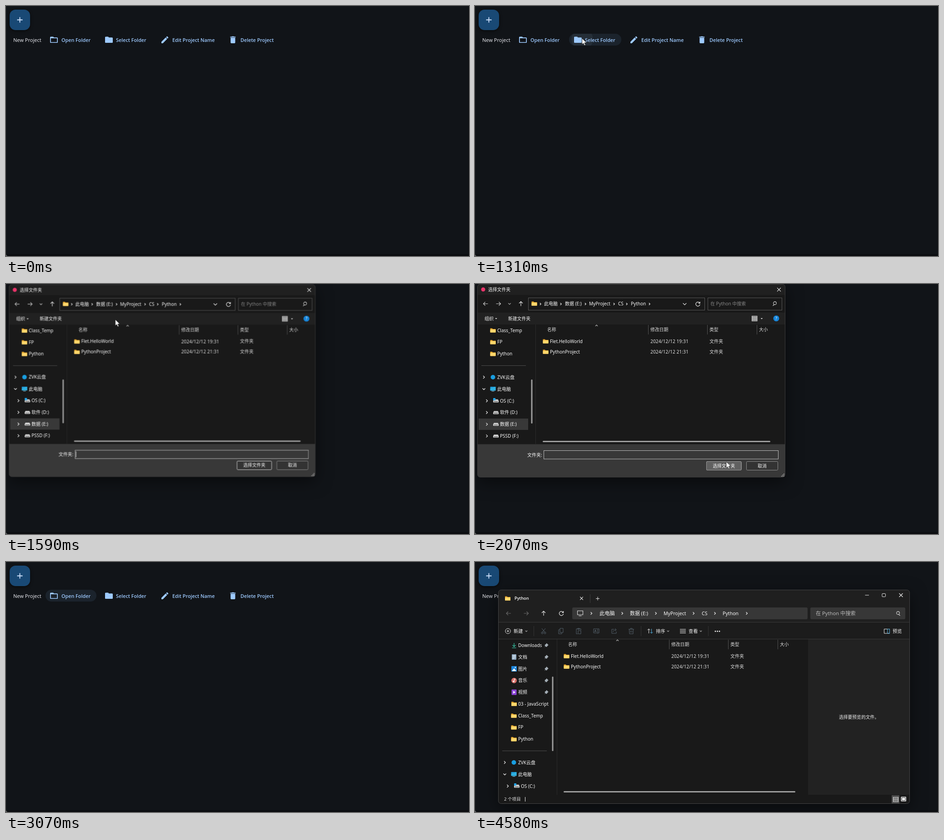
Write an HTML page that moves like this. It is 1019 px wide and 550 px high and loops after 5.45 s.

```html
<!DOCTYPE html>
<html lang="zh-CN">
<head>
<meta charset="utf-8">
<title>Project folders</title>
<style>
html, body { margin: 0; width: 100%; height: 100%; overflow: hidden; background: #111418; }
svg { display: block; width: 100vw; height: 100vh; }
text { font-family: "Noto Sans", "Noto Sans CJK SC", "Noto Sans CJK", sans-serif; white-space: pre; }
.semi { font-family: "Open Sans", "Noto Sans", sans-serif; font-weight: 600; }
.fab { filter: drop-shadow(0 2px 3px rgba(0,0,0,.55)); }
.frame { filter: drop-shadow(0 10px 18px rgba(0,0,0,.5)); }

.anim { animation: 5450ms linear infinite both; }
#pick { animation-name: pick; }
#open { animation-name: open; }
#pickWave { animation-name: pickWave; transform-origin: 236px 73px; }
#openWave { animation-name: openWave; transform-origin: 131px 74px; }
#dialog { animation-name: dialog; transform-origin: 288px 180px; }
#lastCrumb { animation-name: lastCrumb; animation-timing-function: step-end; }
#caret { animation-name: caret; animation-timing-function: step-end; }
#press { animation-name: press; }
#explorer { animation-name: explorer; animation-timing-function: step-end; }
#cursor { animation-name: cursor; }

@keyframes pick { 0%, 21.1% { opacity: 0 } 22.6%, 28% { opacity: 1 } 29.5%, 100% { opacity: 0 } }
@keyframes open { 0%, 48.6% { opacity: 0 } 50.4%, 59.2% { opacity: 1 } 59.25%, 100% { opacity: 0 } }
@keyframes pickWave {
  0%, 23.3% { transform: scale(0); opacity: 1 }
  24% { transform: scale(.26); opacity: 1 }
  26.2% { transform: scale(1); opacity: 1 }
  28%, 100% { transform: scale(1); opacity: 0 }
}
@keyframes openWave {
  0%, 52.6% { transform: scale(0); opacity: 1 }
  55% { transform: scale(1); opacity: 1 }
  56.3%, 100% { transform: scale(1); opacity: 0 }
}
@keyframes dialog {
  0%, 26.2% { transform: scale(.93); opacity: 0 }
  26.21% { transform: scale(.93); opacity: .5 }
  26.9% { transform: scale(.9705); opacity: 1 }
  27.6% { transform: scale(.9705); opacity: 1; animation-timing-function: ease-out }
  30%, 39.4% { transform: none; opacity: 1 }
  41.65%, 100% { transform: scale(.93); opacity: 0 }
}
@keyframes lastCrumb { 0% { opacity: 0 } 27.69% { opacity: 1 } }
@keyframes caret { 0% { opacity: 1 } 36% { opacity: 0 } }
@keyframes press { 0%, 35% { opacity: 0 } 36.5%, 41.6% { opacity: 1 } 42%, 100% { opacity: 0 } }
@keyframes explorer { 0% { opacity: 0 } 76.69%, 100% { opacity: 1 } }
@keyframes cursor {
  0%, 13.75% { transform: translate(50px,540px); opacity: 0 }
  13.76% { transform: translate(50px,540px); opacity: 1 }
  18% { transform: translate(140px,300px) }
  21.2% { transform: translate(219px,105px) }
  23.2%, 24.1% { transform: translate(235.5px,71px) }
  26.2%, 28.4% { transform: translate(235.5px,73px); animation-timing-function: ease-in-out }
  37.2%, 42% { transform: translate(553px,391px); animation-timing-function: ease-in }
  43.85% { transform: translate(396px,278px) }
  45.3%, 46.7% { transform: translate(276.5px,132px); animation-timing-function: ease-out }
  50.8%, 54.1% { transform: translate(131px,74px) }
  55.6%, 56.3% { transform: translate(199px,276px); opacity: 1 }
  56.31%, 80.35% { transform: translate(512px,435px); opacity: 0 }
  80.36% { transform: translate(512px,435px); opacity: 1 }
  83.3%, 84% { transform: translate(572px,517px); opacity: 1 }
  84.01%, 100% { transform: translate(572px,517px); opacity: 0 }
}
</style>
</head>
<body>
<svg id="stage" viewBox="0 0 1019 550"></svg>
<script>
const at = (x, y, s) => `<g transform="translate(${x} ${y})">${s}</g>`;
const box = (x, y, w, h, fill, more = '') =>
  `<rect x="${x}" y="${y}" width="${w}" height="${h}" fill="${fill}" ${more}/>`;
const shape = (d, fill, more = '') => `<path d="${d}" fill="${fill}" ${more}/>`;
const line = (d, color = '#e8e8e8', w = 1) => shape(d, 'none', `stroke="${color}" stroke-width="${w}"`);
const dot = (x, y, r, fill) => `<circle cx="${x}" cy="${y}" r="${r}" fill="${fill}"/>`;
// y is the middle of the capitals
const label = (x, y, s, size = 10, fill = '#fafafa', more = '') =>
  `<text x="${x}" y="${y + size * .36}" font-size="${size}" fill="${fill}" ${more}>${s}</text>`;
const chevron = (x, y, turn = 0, r = 3, color = '#e8e8e8') =>
  `<g transform="translate(${x} ${y}) rotate(${turn})">${line(`M${-r / 2} ${-r}L${r / 2} 0L${-r / 2} ${r}`, color, 1.3)}</g>`;
const arrow = (x, y, turn, color = '#e8e8e8') =>
  `<g transform="translate(${x} ${y}) rotate(${turn})">${line('M-5 0H5M1 -4L5 0L1 4', color, 1.2)}</g>`;
const cross = (x, y, r) => line(`M${x - r} ${y - r}l${2 * r} ${2 * r}m0 ${-2 * r}l${-2 * r} ${2 * r}`, '#f2f2f2', 1.1);
const triangle = (x, y) => shape(`M${x - 2.3} ${y - 1}h4.6l-2.3 2.6z`, '#e0e0e0');
const refresh = (x, y) => at(x, y, line('M4.2 -1.8A4.6 4.6 0 1 0 4.6 .8M4.6 -5V-1.6H1.2', '#e8e8e8', 1.2));
const lens = (x, y, side) =>
  at(x, y, line(`M${side * 1.2} 2L${side * 4.5} 5M-3.3 -.8a3.3 3.3 0 1 0 6.6 0a3.3 3.3 0 1 0 -6.6 0`, '#dcdcdc', 1.1));
const bars = (x, y, w, n, gap) =>
  line(Array.from({ length: n }, (_, i) => `M${x} ${y + i * gap}h${w}`).join(''), '#e0e0e0', 1);

const folder = (x, y) => at(x, y,
  shape('M-6 -4.6h4.2l1.5 1.5H6V4.6H-6z', '#e5a52b') + box(-6, -2, 12, 6.8, '#ffd76c', 'rx=".8"'));
const drive = (x, y, system) => at(x, y,
  shape('M-4.3 -3.2h8.6L6 -.2H-6z', '#c9c9c9') + box(-6, -.4, 12, 3.8, '#f0f0f0', 'rx=".8"') +
  box(-4.8, .9, 9.6, 1.3, '#3c3c3c') + (system ? box(-6, -6, 5, 5, '#27a7ea') : ''));
const screen = (x, y) => at(x, y,
  box(-6, -5, 12, 8.4, '#209bd8', 'rx=".8"') + shape('M-6 3.4V-1L6 -5V3.4z', '#38c0e8', 'opacity=".6"') +
  box(-3, 4, 6, 1.3, '#7ba8bd'));

// Part of the side tree shared by both windows
function tree(full) {
  let s = ['Class_Temp', 'FP', 'Python'].map((n, i) =>
    folder(39.5, 102 + i * 25.8) + label(49, 102 + i * 25.8, n)).join('');
  s += line('M14 179.5H112', '#4d4d4d');
  s += chevron(19.5, 205) + dot(39.5, 205, 5, '#199ee0') + label(49, 205, 'ZVK云盘');
  s += chevron(19.5, 231, 90) + screen(39.5, 231) + label(49, 231, '此电脑');
  const disks = ['OS (C:)', '软件 (D:)', '数据 (E:)', 'PSSD (F:)'];
  if (full) s += box(8, 296, 109, 25, '#383838');
  return s + disks.slice(0, full ? 4 : 1).map((n, i) => {
    const y = 257 + i * 25.8;
    return chevron(26, y) + drive(46, y, !i) + label(55, y, n);
  }).join('');
}

function files() {
  const head = '#dedede';
  let s = chevron(267.5, 91.5, -90, 2.6, '#a8a8a8') +
    line('M381.5 90V111M511.5 90V111M620.5 90V111', '#535353');
  [[159, '名称'], [386, '修改日期'], [516, '类型'], [625, '大小']].forEach(([x, n]) => s += label(x, 100.5, n, 9.8, head));
  [['Flet.HelloWorld', '19:31'], ['PythonProject', '21:31']].forEach(([n, time], i) => {
    const y = 126 + i * 23;
    s += folder(155.5, y) + label(165, y, n) +
      label(386, y, '2024/12/12 ' + time, 10.3, head) + label(516, y, '文件夹', 10, head);
  });
  return s;
}

function page() {
  const blue = '#9ecaff';
  const icons = [
    [95.3, 122, 'Open Folder', 'M20 6h-8l-2-2H4c-1.1 0-2 .9-2 2v12c0 1.1.9 2 2 2h16c1.1 0 2-.9 2-2V8c0-1.1-.9-2-2-2zm0 12H4V8h16v10z'],
    [216.3, 242, 'Select Folder', 'M10 4H4c-1.1 0-2 .9-2 2v12c0 1.1.9 2 2 2h16c1.1 0 2-.9 2-2V8c0-1.1-.9-2-2-2h-8l-2-2z'],
    [339.5, 366, 'Edit Project Name', 'M3 17.25V21h3.75L17.81 9.94l-3.75-3.75L3 17.25zM20.71 7.04c.39-.39.39-1.02 0-1.41l-2.34-2.34c-.39-.39-1.02-.39-1.41 0l-1.83 1.83 3.75 3.75 1.83-1.83z'],
    [489.2, 516, 'Delete Project', 'M6 19c0 1.1.9 2 2 2h8c1.1 0 2-.9 2-2V7H6v12zM19 4h-3.5l-1-1h-5l-1 1H5v2h14V4z']
  ];
  const pill = (id, x, w, cx, cy) =>
    `<clipPath id="${id}Clip">${box(x, 61, w, 26, '#fff', 'rx="13"')}</clipPath>
     <g id="${id}" class="anim" clip-path="url(#${id}Clip)">${box(x, 61, w, 26, '#1b232c')}
     <circle id="${id}Wave" class="anim" cx="${cx}" cy="${cy}" r="85" fill="#252e37"/></g>`;
  return box(0, 0, 1019, 550, '#111418') +
    box(0, 546.5, 1019, 3.5, '#0a0c0f') + box(1017.5, 0, 1.5, 550, '#0c0e11') +
    shape('M0 545Q0 550 5 550H0z', '#6f7174') +
    box(8, 8, 45, 45, '#194975', 'rx="13" class="fab"') + line('M24.5 30.5h12m-6 -6v12', '#d1e4ff', 1.8) +
    pill('open', 87, 112, 131, 74) + pill('pick', 207, 115, 236, 73) +
    label(16, 75, 'New Project', 11, '#e1e2e8') +
    icons.map(([x, tx, name, d]) =>
      `<g transform="translate(${x} 64.1) scale(.85)">${shape(d, blue)}</g>` +
      label(tx, 75, name, 10.8, blue, 'class="semi"')).join('');
}

function dialog() {
  let s = box(5.5, .5, 677, 424.5, '#191919', 'rx="6" class="frame"') +
    shape('M5.5 24V6.5a6 6 0 0 1 6 -6H676.5a6 6 0 0 1 6 6V24z', '#202020') +
    box(6, 63, 676, 26, '#212121') +
    shape('M5.5 352.5H682.5V419a6 6 0 0 1 -6 6H11.5a6 6 0 0 1 -6 -6z', '#383838') +
    box(5.5, .5, 677, 424.5, 'none', 'rx="6" stroke="#3d3d3d"');
  s += dot(18, 12, 4.5, '#e9346a') + label(29, 12.3, '选择文件夹', 9.8) + cross(669, 12.3, 4);
  s += arrow(23.5, 43.5, 180, '#c8c8c8') + arrow(51.5, 43.5, 0, '#c8c8c8') +
    chevron(76, 43.5, 90, 2.8, '#b0b0b0') + arrow(101, 43.5, -90);
  s += box(117.5, 30.5, 388, 27, '#191919', 'stroke="#575757"') + box(512.5, 30.5, 163, 27, '#191919', 'stroke="#575757"');
  s += folder(130.5, 43);
  [[152, '此电脑'], [198, '数据 (E:)'], [251, 'MyProject'], [315, 'CS'], [343, 'Python']].forEach(([x, n]) => s += label(x, 43.5, n));
  [144, 189, 243, 306, 334].forEach(x => s += chevron(x, 44, 0, 2.3));
  s += `<g id="lastCrumb" class="anim">${chevron(384, 44, 0, 2.3)}</g>`;
  s += chevron(461.5, 44, 90, 3.8) + refresh(490.5, 44) + label(518, 43.5, '在 Python 中搜索', 10, '#858585') + lens(660, 43, -1);
  s += label(21, 76, '组织') + triangle(46.5, 76) + label(73, 76, '新建文件夹', 9.8) +
    box(609.5, 70.5, 11.5, 11, '#777', 'stroke="#d0d0d0"') + bars(610, 73.5, 11, 3, 2.6) + triangle(631, 76) +
    dot(663, 75.7, 6.5, '#1684d8') + label(663, 75.7, '?', 9, '#fff', 'text-anchor="middle"');
  s += line('M133.5 89V352', '#2b2b2b') + tree(true) + files() +
    box(123.5, 210, 3, 97, '#9d9d9d', 'rx="1.5"') + box(149, 345, 501, 3, '#9d9d9d', 'rx="1.5"');
  s += label(115, 376, '文件夹:') + box(151.5, 366.5, 516, 18.5, '#383838', 'stroke="#bdbdbd"') +
    `<g id="caret" class="anim">${line('M153.5 369V382', '#ddd')}</g>`;
  s += box(509.5, 390.5, 76.5, 19, '#333', 'rx="2" stroke="#d8d8d8"') +
    box(509.5, 390.5, 76.5, 19, '#606060', 'rx="2" stroke="#9a9a9a" id="press" class="anim"') +
    box(597.5, 390.5, 69, 19, '#333', 'rx="2" stroke="#8f8f8f"') +
    label(547.7, 400, '选择文件夹', 9.8, '#fff', 'text-anchor="middle"') +
    label(632, 400, '取消', 9.8, '#fff', 'text-anchor="middle"');
  for (let i = 0; i < 3; i++) for (let j = 0; j <= i; j++) s += box(679 - j * 2.5, 417 + i * 2.5, 1.5, 1.5, '#bbb');
  return s;
}

function explorer() {
  const dim = '#535f69';
  let s = box(51.5, 61.5, 905, 470, '#191919', 'rx="6" class="frame"') +
    shape('M51.5 132V67.5a6 6 0 0 1 6 -6H950.5a6 6 0 0 1 6 6V132z', '#1f1f1f') +
    box(52, 133, 904, 36, '#1c1c1c') + box(733, 170, 223, 342, '#222') +
    line('M52 132.5H956M52 169.5H956', '#393939') + line('M253.5 71V90', '#3b3b3b') +
    box(51.5, 61.5, 905, 470, 'none', 'rx="6" stroke="#454545"');
  s += folder(72, 80) + label(87, 80, 'Python', 9.2, '#fff', 'class="semi"') + cross(234.5, 80, 3.3) +
    line('M266 80.5h8m-4 -4v8M858.5 73H867') + box(896, 69.5, 7.5, 7, 'none', 'stroke="#e8e8e8" rx="1"') + cross(937.5, 73, 4);
  s += arrow(74, 113, 180, '#686868') + arrow(112.5, 113, 0, '#686868') + arrow(151, 113, -90) + refresh(190, 113);
  s += box(214, 100, 518, 26, '#373737', 'rx="3"') + box(738, 100, 209, 26, '#373737', 'rx="3"');
  s += line('M225.5 107.5h12v8.5h-12zM228.5 118.5h6', '#e0e0e0', 1.1);
  [[274, '此电脑', 11.2], [341, '数据 (E:)', 10.9], [415, 'MyProject', 10.6], [499, 'CS', 10.6], [545, 'Python', 10.6]]
    .forEach(([x, n, size]) => s += label(x, 113, n, size));
  [256, 324, 398, 481, 528, 598].forEach(x => s += chevron(x, 113, 0, 2.8));
  s += label(750, 113, '在 Python 中搜索', 11.2, '#bababa') + lens(931, 113, 1);

  s += at(72.5, 152, line('M-5.7 0a5.7 5.7 0 1 0 11.4 0a5.7 5.7 0 1 0 -11.4 0M-2.8 0h5.6M0 -2.8v5.6')) +
    label(85, 152, '新建', 10.2) + label(398, 152, '排序', 10.2) + label(470, 152, '查看', 10.2) + label(919, 152, '预览', 10.2);
  [113, 425, 497].forEach(x => s += chevron(x, 152, 90, 2.2, '#aaa'));
  s += line('M129.5 141V163M365.5 141V163M513.5 141V163', '#343434');
  [
    [151, 'M-4 -6L3 3M4 -6L-3 3M-5 4a2 2 0 1 0 4 0a2 2 0 1 0 -4 0M1 4a2 2 0 1 0 4 0a2 2 0 1 0 -4 0'],
    [189, 'M-2 -6H5V3H-2zM-2 -3H-5V6H2V3'],
    [228, 'M-2 6H-5V-5H5V-2M-2 -6H2V-4H-2zM-1 -1H5V6H-1z'],
    [267, 'M2 -5H-6V4H2M4 -5H6V4H4M3 -6V6M-4 2L-2 -3L0 2M-3.3 .5h2.6'],
    [306, 'M0 -4H-5V5H5V1M-2 2Q-2 -3 5 -3M2 -6L5 -3L2 0'],
    [344, 'M-6 -4H6M-2 -4V-6H2V-4M-4.5 -4L-4 6H4L4.5 -4M-1.5 -1V3M1.5 -1V3']
  ].forEach(([x, d]) => s += at(x, 152, line(d, dim)));
  s += line('M382.5 157V147M379.5 150L382.5 147L385.5 150') + line('M388.5 147V157M385.5 154L388.5 157L391.5 154', '#55b4e5') +
    bars(451, 148, 13, 4, 2.8) + [529, 533.5, 538].map(x => dot(x, 152.5, 1.4, '#eee')).join('') +
    line('M900.5 147.5h12v9.5h-12z') + line('M908 147.5h4.5v9.5h-4.5z', '#55b4e5');

  const quick = [
    ['Downloads', line('M0 -5V3M-3.5 -.5L0 3L3.5 -.5M-4.5 5.5h9', '#35b99b', 1.3)],
    ['文档', box(-5, -6, 10, 12, '#93adc4', 'rx="1"') + line('M-3 -3h6M-3 0h6M-3 3h4', '#fff')],
    ['图片', box(-6, -6, 12, 12, '#1c86dc', 'rx="1"') + shape('M-5 5L0 -1L5 5z', '#fff') + dot(2.7, -3, 1.2, '#fff')],
    ['音乐', dot(0, 0, 6, '#d6706a') + dot(-1, 2, 1.7, '#fff') + line('M.4 2V-3.5L3 -2.5', '#fff', 1.1)],
    ['视频', box(-5.5, -6, 11, 12, '#8c45d6', 'rx="1"') + shape('M-1.8 -3L3 0L-1.8 3z', '#fff')]
  ];
  quick.forEach(([n, icon], i) => {
    const y = 183.3 + i * 25.8;
    s += at(86, y, icon) + label(95, y, n) +
      at(157, y, shape('M.5 -4.8L4.8 -.5L3 .6L1.2 3.3L-.2 3.7L-1.6 2.3L-4.6 4.8L-2.2 1.7L-3.6 .3L-3.3 -1L-.6 -3z', '#a3adb5'));
  });
  s += folder(86, 312) + label(95, 312, '03 - JavaScript', 10.2) +
    line('M180.5 170V512', '#2b2b2b') + at(46, 236, tree(false)) + at(46, 81, files());
  s += box(169.5, 252, 3, 164, '#9d9d9d', 'rx="1.5"') + box(195, 504, 510, 3, '#9d9d9d', 'rx="1.5"');
  s += label(845, 341.5, '选择要预览的文件。', 9.8, '#f0f0f0', 'text-anchor="middle"');
  s += label(64, 522, '2 个项目', 9.6, '#e6e6e6') + line('M110.5 517V527', '#eee') +
    box(917, 513, 17, 18, '#4a4a4a') + box(920.5, 517.5, 11, 10, 'none', 'stroke="#ddd"') + bars(920, 520, 12, 3, 2.5) +
    box(937.5, 516.5, 11.5, 10, '#eee', 'rx="1"') + box(939.5, 518.5, 7.5, 6, '#fff', 'stroke="#333"');
  return s;
}

const group = (id, s) => `<g id="${id}" class="anim">${s}</g>`;
document.getElementById('stage').innerHTML = page() + group('dialog', dialog()) + group('explorer', explorer()) +
  group('cursor', shape('M0 0V13.6L3.1 10.8L5.3 15.8L7.6 14.8L5.4 9.9H9.7z', '#fff', 'stroke="#111" stroke-width=".7"'));
</script>
</body>
</html>
```
